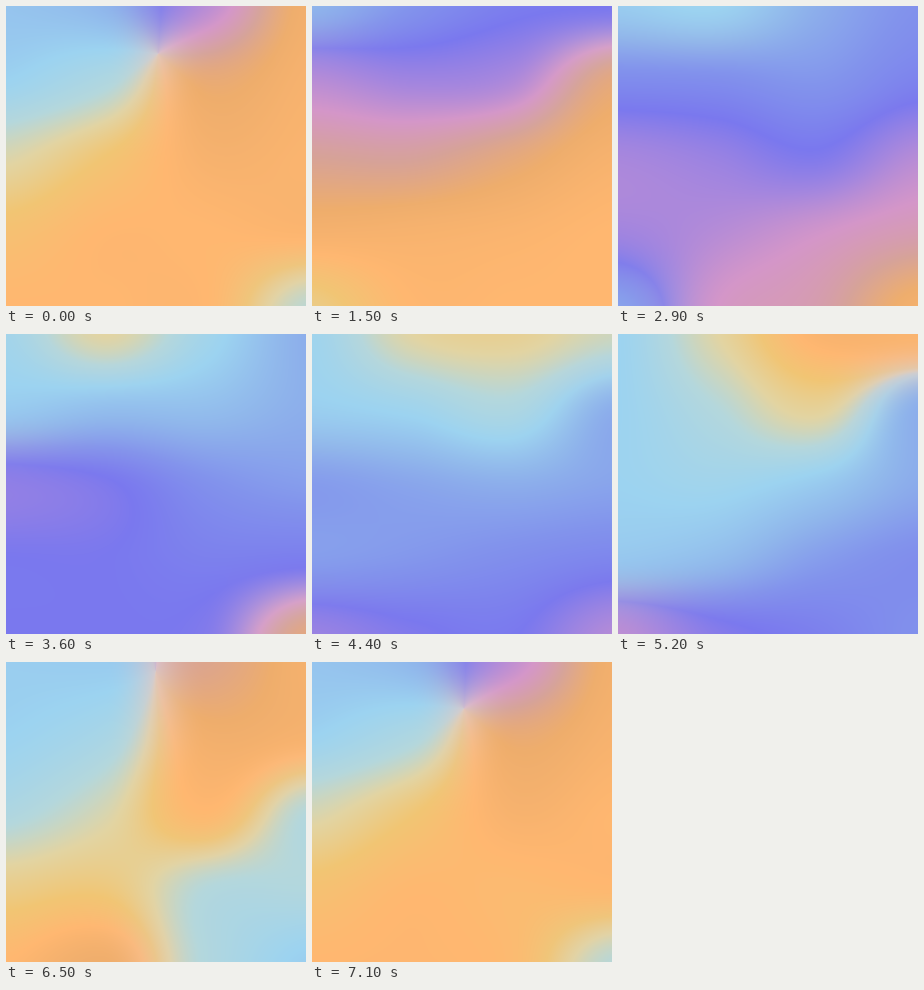
An HTML page with a canvas for the animation above (7200 ms loop, 300 px wide and 300 px high).

```html
<!DOCTYPE html>
<html lang="en">
<head>
<meta charset="utf-8">
<title>Drifting gradient</title>
<style>
html, body { margin: 0; width: 100%; height: 100%; overflow: hidden; }
canvas { display: block; width: 100%; height: 100%; }
</style>
</head>
<body>
<canvas id="stage" width="300" height="300"></canvas>
<script>
const SIZE = 300, COLS = 4, ROWS = 5, HUES = 12;
const LOOP = 7200, STEP = 100;

// Colour wheel: sky, yellow, orange, pink, indigo and back to sky.
const wheel = [
  [156, 211, 240], [180, 215, 220], [226, 212, 162], [241, 197, 115],
  [255, 183, 112], [238, 173, 108], [214, 162, 152], [212, 150, 200],
  [165, 134, 222], [122, 120, 238], [130, 147, 236], [143, 181, 235]
];
const pale = [220, 200, 200];

// Wheel positions at the control points of each pose, row by row.
const poses = [
  { at: 0, hues: [
    11.5, 11, 7.6, 4.8,
    0, 0.8, 5.2, 4.5,
    1.8, 3, 4.5, 4.3,
    3.3, 4, 4, 4.2,
    4, 4, 4, 1.2] },
  { at: 1500, hues: [
    11, 10, 9.2, 9,
    7.6, 8.1, 7.8, 5.4,
    6, 6.1, 5.4, 4.5,
    4.6, 4.5, 4.3, 4,
    2.6, 4, 4, 4] },
  { at: 2300, hues: [
    11.3, 10.3, 9.5, 9.2,
    8, 8.5, 9, 8.2,
    7.5, 7.8, 8, 5.4,
    7.3, 6.5, 5.2, 4.3,
    11.7, 5.3, 4.4, 4] },
  { at: 3600, hues: [
    0.3, 2, 0.3, 10.8,
    11.7, 11.3, 11.3, 10.8,
    8.5, 8.9, 9.9, 10.3,
    9, 9, 9.3, 9.2,
    9, 9, 8.8, 5.5] },
  { at: 5200, hues: [
    0, 2, 4.3, 4.3,
    0, 1, 2.2, 10.8,
    0, 0.2, 11.7, 10.7,
    11.6, 11.2, 10.3, 9.8,
    7.5, 8.7, 9.3, 9.9] },
  { at: 6100, hues: [
    0, 0.2, 4.6, 4.5,
    0, 0.4, 4.5, 4.5,
    0.1, 1, 3.6, 11,
    2, 2, 11.2, 10.9,
    4, 5.5, 11, 11] }
];
poses.push({ at: 7150, hues: poses[0].hues });

const ctx = document.getElementById("stage").getContext("2d");
const image = ctx.createImageData(SIZE, SIZE);
const clamp = (v, lo, hi) => Math.min(hi, Math.max(lo, v));

// Catmull-Rom weights over the neighbouring control points.
function splineWeights(count) {
  return Array.from({ length: SIZE }, (_, p) => {
    const u = (p + 0.5) / SIZE * (count - 1);
    const i = Math.floor(u), f = u - i;
    const weights = [
      f * (-1 + f * (2 - f)) / 2,
      1 + f * f * (3 * f - 5) / 2,
      f * (1 + f * (4 - 3 * f)) / 2,
      f * f * (f - 1) / 2
    ];
    return weights.map((w, k) => ({ w, i: clamp(i + k - 1, 0, count - 1) }));
  });
}
const across = splineWeights(COLS), down = splineWeights(ROWS);

function huesAt(time) {
  let k = 0;
  while (k < poses.length - 2 && time >= poses[k + 1].at) k++;
  const from = poses[k], to = poses[k + 1];
  const f = clamp((time - from.at) / (to.at - from.at), 0, 1);
  return from.hues.map((hue, i) => {
    const turn = to.hues[i] - hue;
    return hue + f * (turn - HUES * Math.round(turn / HUES));
  });
}

function blend(points, get) {
  let sum = 0;
  for (const { w, i } of points) sum += w * get(i);
  return sum;
}

function draw(time) {
  const angles = huesAt(time).map(h => h * 2 * Math.PI / HUES);
  const rows = [];
  for (let r = 0; r < ROWS; r++) {
    rows.push(across.map(points => [
      blend(points, c => Math.cos(angles[r * COLS + c])),
      blend(points, c => Math.sin(angles[r * COLS + c]))
    ]));
  }
  let o = 0;
  for (let y = 0; y < SIZE; y++) {
    for (let x = 0; x < SIZE; x++) {
      const a = blend(down[y], r => rows[r][x][0]);
      const b = blend(down[y], r => rows[r][x][1]);
      const hue = (Math.atan2(b, a) / (2 * Math.PI) + 1) * HUES;
      const i = Math.floor(hue), f = hue - i;
      const c0 = wheel[i % HUES], c1 = wheel[(i + 1) % HUES];
      const fade = 0.85 * Math.max(0, 1 - Math.hypot(a, b)) ** 1.5;
      for (let k = 0; k < 3; k++) {
        const tone = c0[k] + (c1[k] - c0[k]) * f;
        image.data[o++] = tone + (pale[k] - tone) * fade;
      }
      image.data[o++] = 255;
    }
  }
  ctx.putImageData(image, 0, 0);
}

const start = performance.now();
let shown = -1;
function tick() {
  const elapsed = (performance.now() - start) % LOOP;
  const time = Math.floor(elapsed / STEP) * STEP;
  if (time !== shown) draw(shown = time);
  requestAnimationFrame(tick);
}
tick();
</script>
</body>
</html>
```
